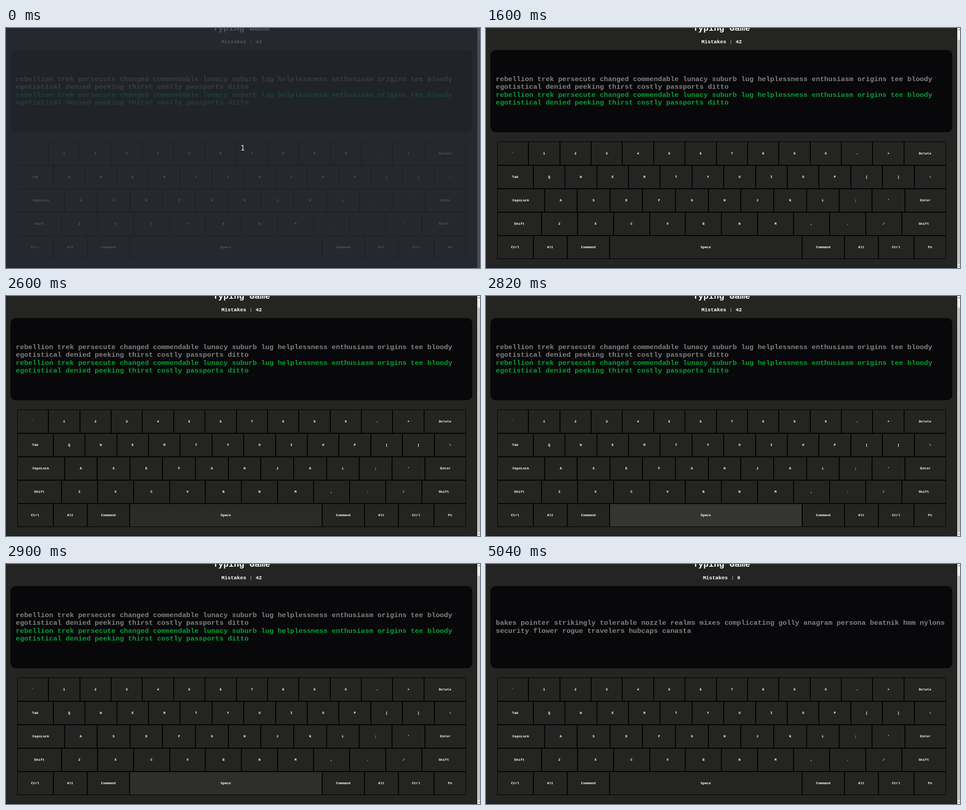
An HTML page with a canvas for the animation above (6400 ms loop, 1051 by 533 pixels).

```html
<!DOCTYPE html>
<html lang="en">
<head>
<meta charset="utf-8">
<title>Typing Game</title>
<style>
html, body { margin: 0; width: 100%; height: 100%; overflow: hidden; background: #242422; }
canvas { display: block; }
</style>
</head>
<body>
<canvas id="stage" width="1051" height="533"></canvas>
<script>
const ctx = document.getElementById('stage').getContext('2d');
const LOOP = 6400;
const PAGE_W = 1045;
const MID = 522.4;
const BG = '#242422';
const MONO = '"Courier New", "Liberation Mono", monospace';

const KEYS = { left: 24.7, right: 1020, top: 252.4, rowH: 52.1 };
// Width of the first key, of the repeated keys, and the labels; the last key fills the row.
const ROWS = [
  [69.4, 69.4, '` 1 2 3 4 5 6 7 8 9 0 - + Delete'],
  [80.1, 70.4, 'Tab Q W E R T Y U I O P [ ] \\'],
  [104.8, 72.66, "CapsLock A S D F G H J K L ; ' Enter"],
  [98.3, 79.85, 'Shift Z X C V B N M , . / Shift'],
  [80, [75.5, 93.5, 427.2, 93.6, 75.1, 79.5], 'Ctrl Alt Command Space Command Alt Ctrl Fn']
];

const FIRST = [
  'rebellion trek persecute changed commendable lunacy suburb lug helplessness enthusiasm origins tee bloody',
  'egotistical denied peeking thirst costly passports ditto'
];
const SECOND = [
  'bakes pointer strikingly tolerable nozzle realms mixes complicating golly anagram persona beatnik hmm nylons',
  'security flower rogue travelers hubcaps canasta'
];

function rect(x, y, w, h, color) {
  ctx.fillStyle = color;
  ctx.fillRect(x, y, w, h);
}

function text(str, x, y, size, color = '#fff', align = 'center') {
  ctx.font = `bold ${size}px ${MONO}`;
  ctx.textAlign = align;
  ctx.fillStyle = color;
  ctx.fillText(str, x, y);
}

function lines(list, y, color) {
  list.forEach((s, i) => text(s, 21.7, Math.round(y + i * 17.4), 15.36, color, 'left'));
}

function drawKey(label, x0, x1, y0, y1, fill) {
  const x = Math.round(x0), y = Math.round(y0);
  const w = Math.round(x1) - x, h = Math.round(y1) - y;
  rect(x, y, w, h, '#000');
  rect(x + 1, y + 1, w - 2, h - 2, fill);
  text(label, (x0 + x1) / 2, Math.round((y0 + y1) / 2 + 2.4), 7.68);
}

function drawKeyboard(spaceFill) {
  ROWS.forEach(([first, rest, names], r) => {
    const labels = names.split(' ');
    const y = KEYS.top + r * KEYS.rowH;
    let x = KEYS.left;
    labels.forEach((label, i) => {
      const w = i === 0 ? first : Array.isArray(rest) ? rest[i - 1] : rest;
      const end = i === labels.length - 1 ? KEYS.right : x + w;
      drawKey(label, x, end, y, y + KEYS.rowH, label === 'Space' ? spaceFill : BG);
      x = end;
    });
  });
}

function arrow(y, dir) {
  ctx.fillStyle = '#606060';
  ctx.beginPath();
  ctx.moveTo(1046.5, y + dir);
  ctx.lineTo(1050.5, y + dir);
  ctx.lineTo(1048.5, y - dir);
  ctx.fill();
}

function drawScrollbar() {
  rect(PAGE_W, 0, 6, 533, '#f1f1f1');
  rect(PAGE_W + 1, 26, 5, 499, '#c1c1c1');
  arrow(3.5, 1.2);
  arrow(529.5, -1.2);
}

function spaceColor(t) {
  if (t < 2600 || t >= 3000) return BG;
  if (t < 2700) return '#2a2a29';
  if (t < 2900) return '#343433';
  return '#2e2f2a';
}

function draw(t) {
  const fresh = t >= 3000;
  rect(0, 0, 1051, 533, BG);
  text('Typing Game', MID, 6, 19.2);
  text('Mistakes : ' + (fresh ? 0 : 42), MID, 34, 11.52);

  ctx.fillStyle = '#08080a';
  ctx.beginPath();
  ctx.roundRect(10, 49, 1024, 182.5, 12);
  ctx.fill();

  if (fresh) {
    lines(SECOND, 135.4, '#808080');
  } else {
    lines(FIRST, 118, '#808080');
    lines(FIRST, 152.8, '#02a033');
  }

  drawKeyboard(spaceColor(t));
  rect(0, 532, PAGE_W, 1, '#0c0c0c');
  drawScrollbar();

  if (t < 100) {
    rect(0, 0, 1051, 533, 'rgba(38, 42, 49, 0.8)');
    ctx.font = '16px "DejaVu Sans", sans-serif';
    ctx.textAlign = 'center';
    ctx.fillStyle = '#f6ead9';
    ctx.fillText('1', 525, 272);
  }
}

function tick() {
  draw(performance.now() % LOOP);
  requestAnimationFrame(tick);
}
tick();
</script>
</body>
</html>
```
